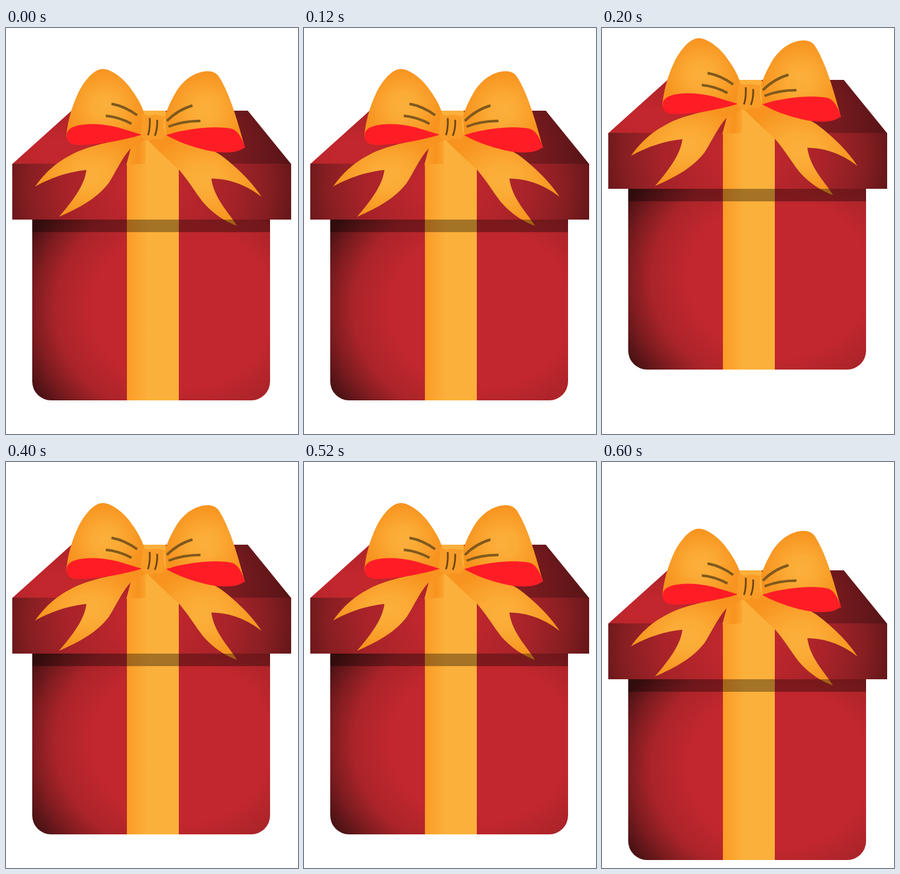
Animation, 512 px wide and 712 px high, one loop 0.8 s. Source, as an HTML page:

```html
<!DOCTYPE html>
<html lang="en">
<head>
<meta charset="utf-8">
<title>Bouncing gift</title>
<style>
html, body { margin: 0; width: 100%; height: 100%; overflow: hidden; background: #fff; }
svg { display: block; width: 100%; height: 100%; }
</style>
</head>
<body>
<svg viewBox="0 0 512 712">
  <defs>
    <radialGradient id="body" gradientUnits="userSpaceOnUse" cx="0" cy="0" r="1" gradientTransform="translate(310 492) scale(305 270)">
      <stop offset=".52" stop-color="#c1272d"/>
      <stop offset=".73" stop-color="#aa2429"/>
      <stop offset=".86" stop-color="#7f1c20"/>
      <stop offset="1" stop-color="#4a1214"/>
    </radialGradient>
    <radialGradient id="front" gradientUnits="userSpaceOnUse" cx="0" cy="0" r="1" gradientTransform="translate(250 275) scale(265 230)">
      <stop offset=".15" stop-color="#c1272d"/>
      <stop offset=".55" stop-color="#a72329"/>
      <stop offset=".8" stop-color="#861e22"/>
      <stop offset="1" stop-color="#5e1618"/>
    </radialGradient>
    <radialGradient id="top" gradientUnits="userSpaceOnUse" cx="0" cy="0" r="1" gradientTransform="translate(90 215) scale(410 200)">
      <stop offset=".1" stop-color="#c1272d"/>
      <stop offset=".5" stop-color="#a02227"/>
      <stop offset="1" stop-color="#571417"/>
    </radialGradient>
    <linearGradient id="band">
      <stop offset="0" stop-color="#fb9b26"/>
      <stop offset=".4" stop-color="#fbb03b"/>
    </linearGradient>
    <linearGradient id="fold">
      <stop offset="0" stop-color="#fba02b"/>
      <stop offset=".6" stop-color="#f7931e"/>
      <stop offset="1" stop-color="#fba32e"/>
    </linearGradient>
    <radialGradient id="silk">
      <stop offset="0" stop-color="#fbb03b"/>
      <stop offset=".35" stop-color="#fbab36"/>
      <stop offset="1" stop-color="#f7931e"/>
    </radialGradient>
  </defs>
  <g id="gift">
    <path fill="url(#body)" d="M46 336H463V620A33 33 0 0 1 430 653H79A33 33 0 0 1 46 620Z"/>
    <path fill="url(#top)" d="M115 145H424L500 238.500H11Z"/>
    <path fill="url(#front)" d="M11 238H500V336H11Z"/>
    <path fill="#fbb03b" d="M240 145H280L303 239H212Z"/>
    <path fill="url(#band)" d="M212 238H303V653H212Z"/>
    <path fill="url(#fold)" d="M219 210L245 193V238L211 240Z"/>

    <g fill="url(#silk)">
      <path d="M238 186C200 198 150 203 115 222C85 237 65 258 51 278C80 262 110 252 141 249C138 275 118 302 93 331C130 315 160 298 180 272C195 248 205 225 219 211L246 195Z"/>
      <path d="M245 193C262 210 285 232 303 248C320 268 330 285 345 305C362 325 385 340 405 347C392 325 365 300 360 264C395 264 425 278 448 296C430 268 400 240 375 222C350 205 310 195 281 186Z"/>
      <path d="M171 72C155 70 137 93 127 113C115 138 107 168 106 190L150 200L237 187L242 150C240 140 232 124 220 108C210 92 186 72 171 72Z"/>
      <path d="M350 76C362 75 370 79 375 88C393 117 406 163 419 210L350 205L281 188L279 155C283 140 289 128 297 114C306 98 325 78 350 76Z"/>
    </g>
    <g fill="#ff1d25">
      <path d="M107 184C112 166 160 165 195 174L238 187C215 195 160 206 125 205C108 204 105 195 107 184Z"/>
      <path d="M281 188C310 177 370 170 397 177C408 181 414 195 419 209C405 221 375 220 350 214C325 208 300 199 281 188Z"/>
    </g>
    <path fill="#f99d28" d="M238 151C245 150 248 156 255 153C263 151 270 153 278 155C275 164 276 177 281 188C277 197 268 196 261 194C254 199 243 199 238 190C235 176 240 164 238 151Z"/>

    <g fill="none" stroke="#80591d" stroke-width="4.500">
      <path d="M185 133Q208 137 230 153M175 154Q198 156 220 168"/>
      <path d="M282 163Q302 143 327 136M285 173Q310 163 341 163"/>
      <path stroke="#6b4512" stroke-width="3" d="M252 158Q253 175 249 188M265 161Q266 176 261 189"/>
    </g>
    <path opacity=".35" d="M46 336H463V358H46Z"/>
  </g>
</svg>
<script>
const gift = document.getElementById("gift");
const hops = [0, -54, 0, 45];
const hold = 200;

function draw() {
  const step = Math.floor(performance.now() / hold) % hops.length;
  gift.setAttribute("transform", `translate(0 ${hops[step]})`);
  requestAnimationFrame(draw);
}
draw();
</script>
</body>
</html>
```
